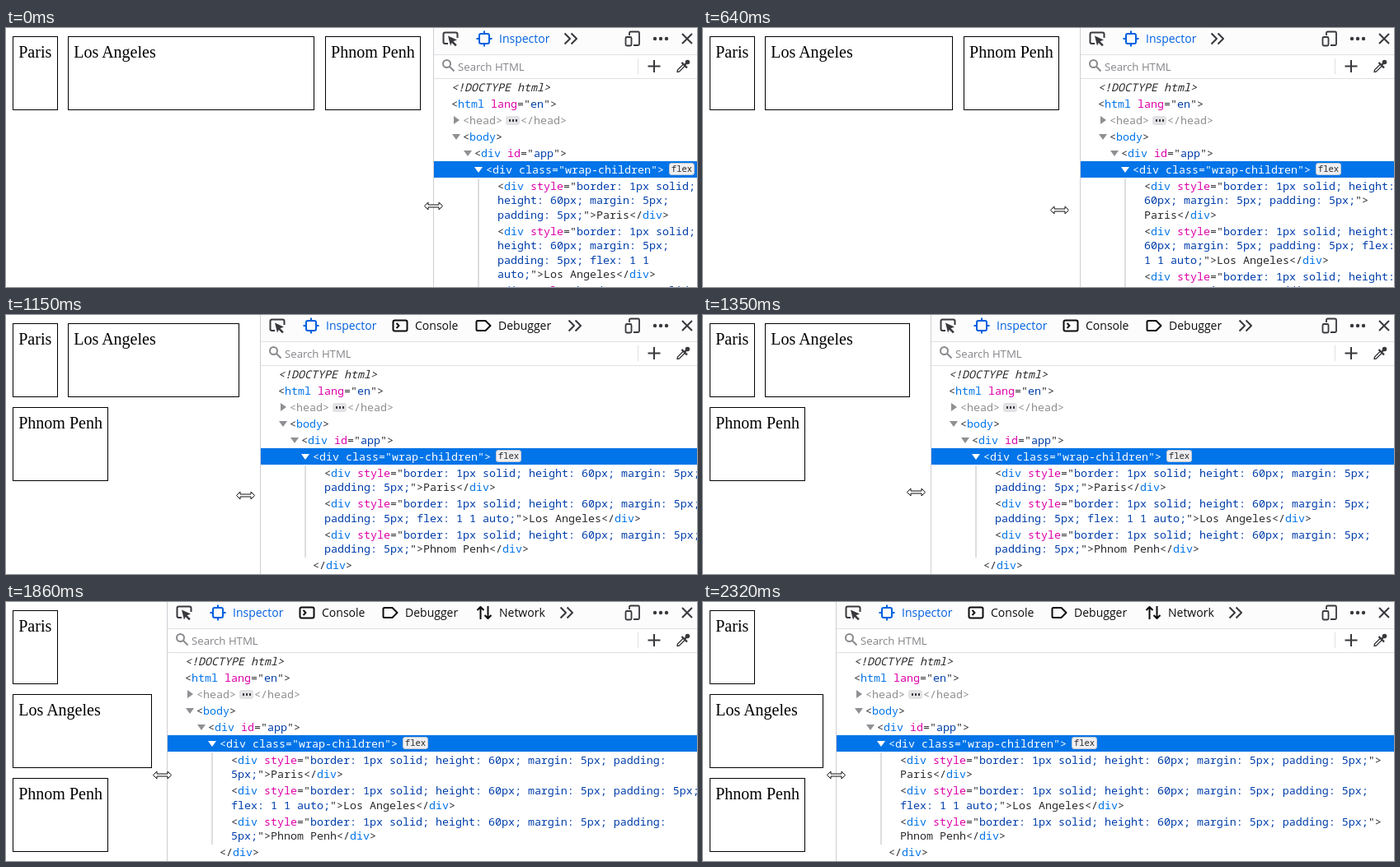
These frames come from a looping animation (838 px wide and 315 px high, 2.55 s). An HTML page:

```html
<!DOCTYPE html>
<html lang="en">
<head>
<meta charset="utf-8">
<title>Flex wrap in a resized viewport</title>
<style>
html, body { margin: 0; width: 100%; height: 100%; overflow: hidden; background: #fff; }
#stage { position: relative; width: 838px; height: 315px; overflow: hidden; }

#page {
  position: absolute; left: 1.75px; top: 3.75px;
  display: flex; flex-wrap: wrap;
  font: 20px "Liberation Serif", "Times New Roman", serif; color: #000;
}
#page div { border: 1px solid #000; height: 75px; margin: 6.25px; padding: 7.25px 6.25px 5.25px; white-space: nowrap; }
#page .grow { flex: 1 1 auto; }

#panel { position: absolute; top: 0; bottom: 0; right: 0; overflow: hidden; background: #fff; color: #38383d; }
#panel::after { content: ""; position: absolute; left: 0; top: 0; width: 1px; height: 100%; background: #cfcfd4; }
.bar { position: absolute; left: 0; right: 0; border-bottom: 1px solid #e0e0e2; }
.tabs { top: 0; height: 32px; background: #fcfcfd; }
.search { top: 33px; height: 28px; }
svg { position: absolute; overflow: visible; fill: none; stroke: currentColor; stroke-width: 2; stroke-linejoin: round; }
.ico { top: 3px; width: 20px; height: 20px; }
.tab { position: absolute; top: 0; font: 14px/20px "Open Sans", sans-serif; color: #0c0c0d; white-space: nowrap; }
.tab span { position: absolute; left: 28px; top: 3px; }
.tab.on { color: #0060df; }
.hint { position: absolute; left: 30px; top: 4px; font: 13.2px/20px "Open Sans", sans-serif; color: #85858a; white-space: nowrap; }
.tools { right: 0; top: 0; width: 100px; height: 62px; }

#tree {
  position: absolute; left: 0; right: 0; top: 62px;
  font: 13.3333px/17.5px "Noto Sans Mono", "DejaVu Sans Mono", monospace; color: #2a2a2e;
}
.row { position: relative; padding: 1.5px 0 1px; margin-left: calc(22px + 14px * var(--d, 0)); white-space: nowrap; }
.kid { --d: 4; margin-right: -5px; white-space: normal; }
.row b, .row i { font-weight: 400; font-style: normal; }
.row b { color: #0074e8; }
.row i { color: #dd00a9; }
.row u { color: #003eaa; text-decoration: none; }
.end { white-space: nowrap; }
.doctype { font-style: italic; }
.fold::before {
  content: ""; position: absolute; left: -13px; top: 7px; width: 10px; height: 7px;
  background: #909094; clip-path: polygon(0 0, 100% 0, 50% 100%);
}
.shut::before { left: -11px; top: 5px; width: 7px; height: 10px; clip-path: polygon(0 0, 100% 50%, 0 100%); }
.shut, .shut b { color: #8e8e92; }
.dots {
  display: inline-block; width: 17px; height: 11px; margin: 0 1px 0 4px; border-radius: 3px; vertical-align: -1px;
  background: radial-gradient(circle, #38383d 1.1px, transparent 1.5px) 2.5px 0 / 4px 11px repeat-x, #e2e2e5;
  background-clip: content-box, border-box; padding: 0 2.5px; box-sizing: border-box;
}
.sel { margin-left: 0; padding-left: 64px; background: #0074e8; }
.sel, .sel b, .sel i, .sel u { color: #fff; }
.sel::before { left: 50px; background: #fff; }
.badge {
  position: absolute; left: 286px; top: 2px; width: 29px; height: 13px; border: 1px solid #c4c8ce; border-radius: 3px;
  background: #efeff1; color: #2a2a2e; font-size: 10.6px; line-height: 13px; text-align: center;
}
.kids { position: relative; }
.kids::before { content: ""; position: absolute; left: 54px; top: 1px; bottom: 0; width: 2px; background: #dedee2; }

#cursor { left: 0; top: 0; width: 1px; height: 1px; fill: #fff; stroke: #111; stroke-width: 1; stroke-linejoin: miter; }
</style>
</head>
<body>
<div id="stage">
  <div id="page"><div>Paris</div><div class="grow">Los Angeles</div><div>Phnom Penh</div></div>

  <div id="panel">
    <div class="bar tabs">
      <svg class="ico" style="left:11px"><path d="M7 16H3.5Q1.500 16 1.500 14V4.500Q1.500 2.500 3.500 2.500H16.500Q18.500 2.500 18.500 4.500V9"/><path d="M7 6.500L18 11.500L13.500 13.200L17.800 17.500L16 19.300L11.700 15L10 18.500Z" fill="currentColor" stroke="none"/></svg>
      <div class="tab on" style="left:52px"><svg class="ico"><rect x="4" y="4" width="12" height="12" rx="2"/><path d="M10 .5V4M10 16V19.500M.5 10H4M16 10H19.500"/></svg><span>Inspector</span></div>
      <div class="tab" style="left:160px"><svg class="ico"><rect x="1.500" y="3.500" width="17" height="13" rx="2"/><path d="M5.500 7L8.500 10L5.500 13"/></svg><span>Console</span></div>
      <div class="tab" style="left:261px"><svg class="ico"><path d="M3 4H12.500L18.500 10L12.500 16H3Q1.500 16 1.500 14.500V5.500Q1.500 4 3 4Z"/></svg><span>Debugger</span></div>
      <div class="tab" style="left:375px"><svg class="ico"><path d="M5.500 18V3M1.500 7L5.500 3L9.500 7M14.500 2V17M10.500 13L14.500 17L18.500 13"/></svg><span>Network</span></div>
      <svg class="ico" id="more"><path d="M2.500 3.500L9 10L2.500 16.500M10.500 3.500L17 10L10.500 16.500"/></svg>
    </div>
    <div class="bar search">
      <svg style="left:10px;top:4px;width:17px;height:17px;color:#8a8a8e"><circle cx="6.500" cy="6.500" r="4.500"/><path d="M10 10L15.500 15.500"/></svg>
      <span class="hint">Search HTML</span>
    </div>
    <svg class="tools" viewBox="738 0 100 62">
      <path d="M756 9V6Q756 4.500 757.500 4.500H766.500Q768 4.500 768 6V19.500Q768 21 766.500 21H761" stroke-width="1.800"/>
      <rect x="751.500" y="11" width="7" height="10.500" rx="1.500" stroke-width="1.800"/>
      <g fill="currentColor" stroke="none"><circle cx="787" cy="13" r="2.200"/><circle cx="794" cy="13" r="2.200"/><circle cx="801" cy="13" r="2.200"/></g>
      <path d="M820 7L832 19M832 7L820 19"/>
      <path d="M766.500 37V56" stroke="#e0e0e2" stroke-width="1"/>
      <path d="M786 39V54M778.500 46.500H793.500"/>
      <path d="M821.500 44L814.500 51L814 53.500L816.500 53L823.500 46" stroke-width="1.300"/>
      <path d="M819.500 42L826 48.500M823.500 44.500L827 41" stroke-width="2.400"/><circle cx="826.500" cy="41.500" r="1.800" fill="currentColor"/>
    </svg>

    <div id="tree">
      <div class="row doctype">&lt;!DOCTYPE html&gt;</div>
      <div class="row">&lt;<b>html</b> <i>lang</i>="<u>en</u>"&gt;</div>
      <div class="row fold shut" style="--d:1">&lt;<b>head</b>&gt;<span class="dots"></span>&lt;/<b>head</b>&gt;</div>
      <div class="row fold" style="--d:1">&lt;<b>body</b>&gt;</div>
      <div class="row fold" style="--d:2">&lt;<b>div</b> <i>id</i>="<u>app</u>"&gt;</div>
      <div class="row fold sel">&lt;<b>div</b> <i>class</i>="<u>wrap-children</u>"&gt;<span class="badge">flex</span></div>
      <div class="kids" id="kids"></div>
      <div class="row" style="--d:3">&lt;/<b>div</b>&gt;</div>
    </div>
  </div>

  <svg id="cursor"><path d="M-11 0L-6.500 -4.500V-1.500H6.500V-4.500L11 0L6.500 4.500V1.500H-6.500V4.500Z"/></svg>
</div>

<script>
const LOOP = 2550, WIDTH = 838;
const $ = id => document.getElementById(id);
const page = $('page'), panel = $('panel'), cursor = $('cursor'), more = $('more');
const tabs = [...document.querySelectorAll('.tab')];

const child = (text, extra = '') =>
  `<div class="row kid">&lt;<b>div</b> <i>style</i>="<u>border: 1px solid; height: 60px; margin: 5px; padding: 5px;${extra}</u>"&gt;` +
  `<wbr><span class="end">${text}&lt;/<b>div</b>&gt;</span></div>`;
$('kids').innerHTML = child('Paris') + child('Los Angeles', ' flex: 1 1 auto;') + child('Phnom Penh');

// time, panel left, right edge of the boxes, pointer x, pointer y
const keys = [
  [50, 518, 503, 518, 216],
  [410, 487, 462, 472, 219],
  [610, 463, 438, 440, 221],
  [870, 383, 353, 352, 222],
  [1150, 308, 283, 290, 219],
  [1580, 238, 213, 220, 210],
  [1710, 216, 193, 203, 210],
  [1860, 195, 177, 189, 210],
  [2270, 163, 146, 161, 210],
  [2320, 161, 146, 161, 210]
];

// The screen refreshes every 50 ms, with a few shorter beats
const short = new Set([150, 380, 610, 840, 1070, 1300, 1630, 1860, 2090]);
const beats = [0];
for (let t = 100; t <= 2320; t += short.has(t) ? 30 : 50) beats.push(t);

const rate = (i, c) => (keys[i + 1][c] - keys[i][c]) / (keys[i + 1][0] - keys[i][0]);
function slope(i, c) {
  if (i === 0 || i === keys.length - 1) return 0;
  const a = rate(i - 1, c), b = rate(i, c);
  return a * b > 0 ? 2 * a * b / (a + b) : 0;
}

// Monotone cubic through the keys
function at(t, c) {
  const last = keys.length - 1;
  if (t <= keys[0][0]) return keys[0][c];
  if (t >= keys[last][0]) return keys[last][c];
  const i = keys.findIndex(k => k[0] > t) - 1;
  const span = keys[i + 1][0] - keys[i][0], u = (t - keys[i][0]) / span, v = 1 - u;
  const y = v * v * (1 + 2 * u) * keys[i][c] + u * u * (3 - 2 * u) * keys[i + 1][c] +
    span * (u * v * v * slope(i, c) - u * u * v * slope(i + 1, c));
  return Math.round(y);
}

const tabEnds = [0, 251, 365, 469];
const moreAt = [157, 258, 372, 475];

function draw(t) {
  const left = at(t, 1), room = WIDTH - left - 150;
  panel.style.left = left + 'px';
  page.style.width = at(t, 2) + 4.5 + 'px';
  cursor.style.transform = `translate(${at(t, 3) + 0.5}px, ${at(t, 4) + 0.5}px)`;
  const count = tabEnds.filter(end => end <= room).length;
  tabs.forEach((tab, i) => { tab.style.display = i < count ? '' : 'none'; });
  more.style.left = moreAt[count - 1] + 'px';
}

let start = null, shown = -1;
function tick(now) {
  if (start === null) start = now;
  const t = (now - start) % LOOP;
  const beat = beats.filter(b => b <= t).pop();
  if (beat !== shown) draw(shown = beat);
  requestAnimationFrame(tick);
}
draw(0);
requestAnimationFrame(tick);
</script>
</body>
</html>
```
